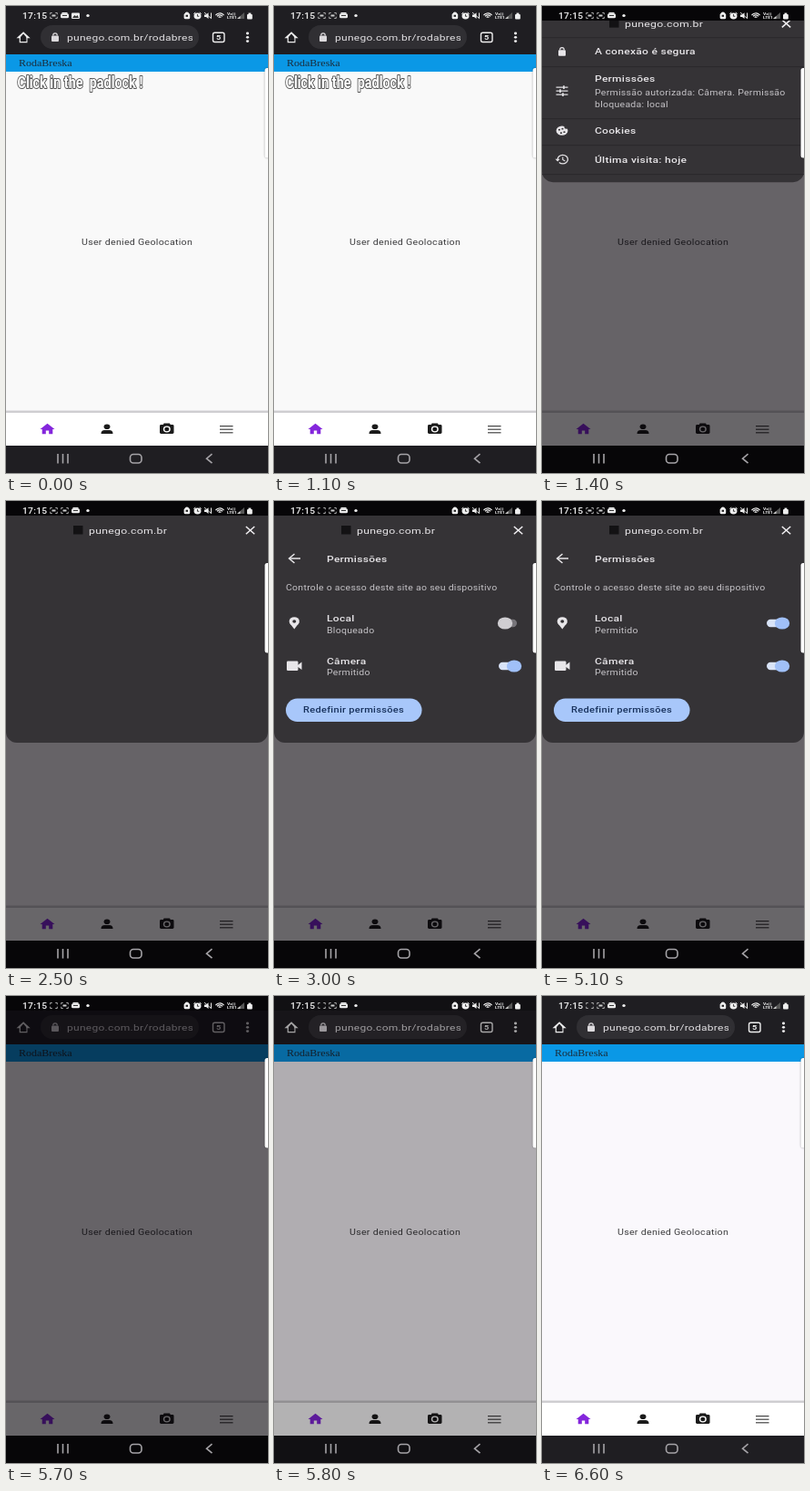
Write an HTML page with a canvas that moves like this. It is 288 px wide and 512 px high and loops after 6800 ms.

```html
<!DOCTYPE html>
<html lang="pt-BR">
<head>
<meta charset="utf-8">
<title>Permissões</title>
<style>
html, body { margin: 0; width: 100%; height: 100%; overflow: hidden; background: #000; }
canvas { display: block; width: 288px; height: 512px; }
</style>
</head>
<body>
<canvas id="stage" width="288" height="512"></canvas>
<script>
const ctx = document.getElementById('stage').getContext('2d');
const LOOP = 6800, STEP = 100;
const WIDE = 1.25; // the phone screen is shown wider than its real aspect
const SANS = 'Roboto, "Noto Sans", sans-serif';
const SERIF = '"Liberation Serif", "Noto Serif", serif';
const HOST = 'punego.com.br';
const LIGHT = '#e8e6e9', BLUE = '#a8c7fa', SHEET = '#353336';

const clamp = v => Math.max(0, Math.min(1, v));
const ramp = (t, a, b) => clamp((t - a) / (b - a));

function rect(x, y, w, h, fill) {
  ctx.fillStyle = fill;
  ctx.fillRect(x, y, w, h);
}

function round(x, y, w, h, r, fill) {
  ctx.beginPath();
  ctx.roundRect(x, y, w, h, r);
  ctx.fillStyle = fill;
  ctx.fill();
}

function oval(x, y, rx, ry, fill) {
  ctx.beginPath();
  ctx.ellipse(x, y, rx, ry, 0, 0, Math.PI * 2);
  ctx.fillStyle = fill;
  ctx.fill();
}

function poly(points, fill) {
  ctx.beginPath();
  points.forEach(([x, y]) => ctx.lineTo(x, y));
  ctx.fillStyle = fill;
  ctx.fill();
}

function line(points, color, width = 1.4) {
  ctx.beginPath();
  points.forEach(([x, y]) => ctx.lineTo(x, y));
  ctx.strokeStyle = color;
  ctx.lineWidth = width;
  ctx.stroke();
}

function frameBox(x, y, w, h, r, color, width) {
  ctx.beginPath();
  ctx.roundRect(x, y, w, h, r);
  ctx.strokeStyle = color;
  ctx.lineWidth = width;
  ctx.stroke();
}

function text(str, x, y, size, color, weight = 400, family = SANS, spacing = 0.23) {
  ctx.save();
  ctx.translate(x, y + size * 0.39);
  ctx.scale(WIDE, 1);
  ctx.font = `${weight} ${size}px ${family}`;
  ctx.letterSpacing = spacing + 'px';
  ctx.fillStyle = color;
  ctx.fillText(str, 0, 0);
  ctx.restore();
}

function lock(x, y, color) {
  round(x - 4, y - 1.5, 8, 6.5, 1, color);
  ctx.beginPath();
  ctx.ellipse(x, y - 1.5, 2.3, 2.6, 0, Math.PI, 0);
  ctx.strokeStyle = color;
  ctx.lineWidth = 1.2;
  ctx.stroke();
}

function corners(x, y, filled) {
  for (const sx of [-1, 1]) for (const sy of [-1, 1])
    line([[x + sx * 1.8, y + sy * 3], [x + sx * 3.8, y + sy * 3], [x + sx * 3.8, y + sy * 1.2]], '#bbb', 0.9);
  if (filled) rect(x - 2, y - 1, 4, 2, '#ccc');
}

function chatIcon(x, y) {
  round(x - 4.5, y - 2.2, 9, 5, 1.5, '#eee');
  rect(x - 3, y - 3.5, 6, 1.5, '#eee');
  rect(x - 2.5, y - 0.5, 5, 1, '#333');
}

function pictureIcon(x, y) {
  round(x - 4.5, y - 3, 9, 6.5, 1, '#eee');
  poly([[x - 3.5, y + 2.5], [x - 1, y - 0.5], [x + 0.5, y + 1], [x + 2, y - 0.5], [x + 3.5, y + 2.5]], '#333');
}

function statusBar(t) {
  text('17:15', 18, 10.8, 8.2, '#f2f2f2', 500);
  if (t < 200) {
    corners(52.5, 10.5, true);
    chatIcon(64.5, 10.5);
    pictureIcon(76.5, 10.5);
  } else {
    corners(52.5, 10.5, Math.floor((t - 100) / 500) % 2 === 0);
    corners(64.5, 10.5, true);
    chatIcon(76.5, 10.5);
  }
  oval(90, 10.5, 1.7, 1.5, '#eee');

  round(195.6, 8, 6.6, 6.3, 1.5, '#eee');
  oval(198.9, 8.4, 2.2, 1.9, '#eee');
  rect(197.6, 9.8, 2.4, 2, '#222');

  oval(210.5, 11, 4, 3.4, '#eee');
  line([[210.5, 9], [210.5, 11.3], [212.3, 11.3]], '#222', 0.8);
  line([[206.3, 8.6], [208.3, 7]], '#eee', 1);
  line([[212.7, 7], [214.7, 8.6]], '#eee', 1);

  poly([[218, 9.5], [220, 9.5], [222.5, 7.3], [222.5, 14], [220, 12], [218, 12]], '#eee');
  line([[218, 7], [226, 14]], '#eee', 0.9);
  line([[225.5, 7.5], [225.5, 13]], '#eee', 1);

  for (let i = 0; i < 3; i++) {
    ctx.beginPath();
    ctx.ellipse(235, 13.5, 1.6 + i * 2, 1.6 + i * 2, 0, Math.PI * 1.2, Math.PI * 1.8);
    ctx.strokeStyle = '#eee';
    ctx.lineWidth = 1.2;
    ctx.stroke();
  }
  text('Vo))', 243, 8.6, 4, '#eee', 700, SANS, 0);
  text('LTE1', 243, 12.4, 4, '#eee', 700, SANS, 0);
  poly([[254, 14], [262, 14], [262, 7]], '#555');
  poly([[254, 14], [257.5, 14], [257.5, 11]], '#ccc');
  round(265, 9, 5.8, 5.4, 1, '#eee');
  rect(266.5, 7.6, 2.8, 1.5, '#eee');
}

function toolbar() {
  rect(0, 0, 288, 53, '#1f1e22');
  ctx.lineJoin = 'miter';
  frameBox(15.3, 34, 7.6, 5.6, 0, '#eee', 1.2);
  poly([[11.5, 35.2], [19.1, 28.3], [26.7, 35.2]], '#eee');
  poly([[16, 34], [19.1, 30.6], [22.2, 34], [22.2, 39], [16, 39]], '#1f1e22');
  round(38, 21, 174, 26, 13, '#302f33');
  lock(54, 34, '#dcdadd');
  ctx.save();
  ctx.beginPath();
  ctx.rect(60, 21, 145, 26);
  ctx.clip();
  text(HOST + '/rodabreska', 67, 34.2, 9.6, '#e4e2e5');
  ctx.restore();
  frameBox(227.5, 29.2, 12.5, 10.3, 2, '#eee', 1.4);
  text('5', 231, 34.3, 7.4, '#eee', 700, SANS, 0);
  for (let y = 30; y <= 39; y += 4.3) oval(265.5, y, 1.6, 1.4, '#eee');
}

function navBar() {
  rect(0, 443, 288, 1, '#e6e5e8');
  rect(0, 444, 288, 2, '#cfced1');
  rect(0, 446, 288, 36, '#fff');

  poly([[37.5, 464], [45.5, 457.8], [53.5, 464], [51.3, 464], [51.3, 469.3], [47.2, 469.3],
    [47.2, 465.5], [43.8, 465.5], [43.8, 469.3], [39.7, 469.3], [39.7, 464]], '#8426dc');

  oval(111, 461.3, 3.4, 2.8, '#1b1b1b');
  round(104.5, 465, 13, 4, [4, 4, 0, 0], '#1b1b1b');

  round(169, 459, 15.5, 10, 1.4, '#1b1b1b');
  round(173, 457.5, 7.5, 3, 1, '#1b1b1b');
  oval(176.8, 464, 4, 3.4, '#fff');
  oval(176.8, 464, 2.6, 2.2, '#1b1b1b');

  for (const y of [460, 463.6, 467.2]) rect(235, y, 14.5, 1.2, '#444');
}

function systemBar() {
  rect(0, 482, 288, 30, '#1f1e22');
}

function systemKeys() {
  for (const x of [57, 62.5, 68]) line([[x, 491], [x, 501.5]], '#a5a3a7', 1.6);
  frameBox(136.5, 491.5, 12.5, 9.5, 3.5, '#a5a3a7', 1.6);
  line([[226.5, 491.2], [220.5, 496.2], [226.5, 501.2]], '#a5a3a7', 1.6);
}

// Tall, narrow poster lettering.
function caption() {
  const words = 'Click in the  padlock !';
  ctx.save();
  ctx.translate(12.5, 90.3);
  ctx.scale(0.8, 1);
  ctx.font = `700 18px ${SANS}`;
  ctx.lineJoin = 'round';
  ctx.lineWidth = 2;
  ctx.strokeStyle = '#555';
  ctx.fillStyle = '#fff';
  ctx.strokeText(words, 0, 0);
  ctx.fillText(words, 0, 0);
  ctx.restore();
}

function page(t) {
  rect(0, 0, 288, 512, t < 1300 ? '#f9f9f9' : '#faf8fc');
  toolbar();
  rect(0, 53, 288, 19, '#0a98e6');
  text('RodaBreska', 14, 62, 9.6, '#1b2c3a', 400, SERIF, 0);
  text('User denied Geolocation', 83, 258.6, 8.5, '#3c3c3e');
  navBar();
  systemBar();
  if (t < 1300) caption();
}

function slidersIcon(x, y) {
  [[-4, 2], [0, -2], [4, 1]].forEach(([dy, k]) => {
    line([[x - 6.5, y + dy], [x + 6.5, y + dy]], LIGHT, 1.2);
    line([[x + k, y + dy - 1.8], [x + k, y + dy + 1.8]], LIGHT, 1.6);
  });
}

function cookieIcon(x, y) {
  oval(x, y, 6.4, 5.2, LIGHT);
  oval(x + 4.8, y - 4, 2.4, 2, SHEET);
  [[-3, -1], [-1, 2.5], [2.5, 1.5], [0.5, -2]].forEach(([dx, dy]) => oval(x + dx, y + dy, 1.1, 0.9, SHEET));
}

function historyIcon(x, y) {
  ctx.beginPath();
  ctx.ellipse(x + 0.8, y, 5.6, 4.7, 0, -Math.PI, Math.PI * 0.75);
  ctx.strokeStyle = LIGHT;
  ctx.lineWidth = 1.3;
  ctx.stroke();
  poly([[x - 7.5, y - 0.3], [x - 2.2, y - 0.3], [x - 4.8, y + 2.4]], LIGHT);
  line([[x + 0.8, y - 2.6], [x + 0.8, y + 0.4], [x + 3.4, y + 1.8]], LIGHT, 1.1);
}

function mainView() {
  for (const y of [47, 79, 136, 165, 197]) rect(0, y, 288, 1, '#2a282b');
  lock(22, 62.5, LIGHT);
  text('A conexão é segura', 58, 62.2, 9.6, LIGHT, 500);
  slidersIcon(22, 106);
  text('Permissões', 58, 92, 9.6, LIGHT, 500);
  text('Permissão autorizada: Câmera. Permissão', 58, 107.8, 8.4, '#c6c4c8');
  text('bloqueada: local', 58, 120.3, 8.4, '#c6c4c8');
  cookieIcon(22, 149.5);
  text('Cookies', 58, 149.3, 9.6, LIGHT, 500);
  historyIcon(22, 181);
  text('Última visita: hoje', 58, 180.8, 9.6, LIGHT, 500);
}

function toggle(y, pos, on) {
  round(247, y - 4.2, 20, 8.4, 4.2, on ? '#d9e4f8' : '#77757a');
  oval(254 + 10 * pos, y, 8.2, 6.6, on ? '#a0c0f8' : '#d0ced2');
}

function ripple(t) {
  if (t < 3600 || t >= 4200) return;
  ctx.save();
  ctx.beginPath();
  ctx.rect(0, 111, 288, 46.5);
  ctx.clip();
  ctx.globalAlpha *= 1 - ramp(t, 3900, 4200);
  const r = 241 * (t - 3500) / 300;
  oval(254, 134, r, r, '#484648');
  ctx.restore();
}

function permissionView(t) {
  ripple(t);
  line([[29, 63], [17, 63]], LIGHT, 1.5);
  line([[22.5, 58], [16.6, 63], [22.5, 68]], LIGHT, 1.5);
  text('Permissões', 58, 63, 9.6, LIGHT, 500);
  text('Controle o acesso deste site ao seu dispositivo', 13, 95.1, 8.4, '#c6c4c8');

  const allowed = t >= 3800;
  oval(22.3, 132, 5.6, 4.8, LIGHT);
  poly([[17, 133.5], [27.6, 133.5], [22.3, 140.5]], LIGHT);
  oval(22.3, 132, 2, 1.7, SHEET);
  text('Local', 58, 128.3, 9.6, LIGHT, 500);
  text(allowed ? 'Permitido' : 'Bloqueado', 58, 141.3, 8.4, '#c6c4c8');
  toggle(134, ramp(t, 3800, 4000), allowed);

  round(14, 175.5, 12.5, 10.5, 1.2, LIGHT);
  poly([[26, 180], [30.5, 176.5], [30.5, 185], [26, 181.8]], LIGHT);
  text('Câmera', 58, 175, 9.6, LIGHT, 500);
  text('Permitido', 58, 187.8, 8.4, '#c6c4c8');
  toggle(181, 1, true);

  round(13, 216.5, 149.5, 25.5, 12.7, BLUE);
  text('Redefinir permissões', 32, 229, 8.85, '#17315c', 500);
}

function sheet(t) {
  if (t < 1300 || t >= 5700) return;
  const slide = t < 5300 ? -430 * Math.exp((1200 - t) / 57) : -265 * ramp(t, 5300, 5700) ** 1.5;
  const height = 206 + 59 * ramp(t, 2300, 2500);
  ctx.save();
  ctx.beginPath();
  ctx.rect(0, 16, 288, 496);
  ctx.clip();
  ctx.translate(0, slide);
  round(0, -40, 288, height + 40, 12, SHEET);

  rect(74, 27, 10.5, 9.5, '#131214');
  text(HOST, 91, 31.8, 9.8, LIGHT);
  line([[263.8, 28], [273.2, 36.3]], '#f2f0f3', 1.5);
  line([[273.2, 28], [263.8, 36.3]], '#f2f0f3', 1.5);

  if (t < 2500) {
    ctx.globalAlpha = 1 - ramp(t, 2300, 2500);
    mainView();
  } else {
    ctx.globalAlpha = ramp(t, 2500, 2800);
    permissionView(t);
  }
  ctx.restore();
}

function handle() {
  ctx.save();
  ctx.shadowColor = 'rgba(0,0,0,.4)';
  ctx.shadowBlur = 2;
  round(284.5, 68, 8, 98.5, 2.5, '#fff');
  ctx.restore();
}

function draw(t) {
  page(t);
  const dim = ramp(t, 1200, 1400) - ramp(t, 5700, 5900);
  if (dim > 0) {
    rect(0, 0, 288, 512, `rgba(4,0,6,${0.6 * dim})`);
    rect(0, 0, 288, 16, `rgba(0,0,0,${0.5 * dim})`);
    rect(0, 482, 288, 30, `rgba(0,0,0,${0.5 * dim})`);
  }
  sheet(t);
  statusBar(t);
  systemKeys();
  handle();
}

const start = performance.now();
function tick() {
  const t = (performance.now() - start) % LOOP;
  draw(Math.floor(t / STEP) * STEP);
  requestAnimationFrame(tick);
}
tick();
</script>
</body>
</html>
```
